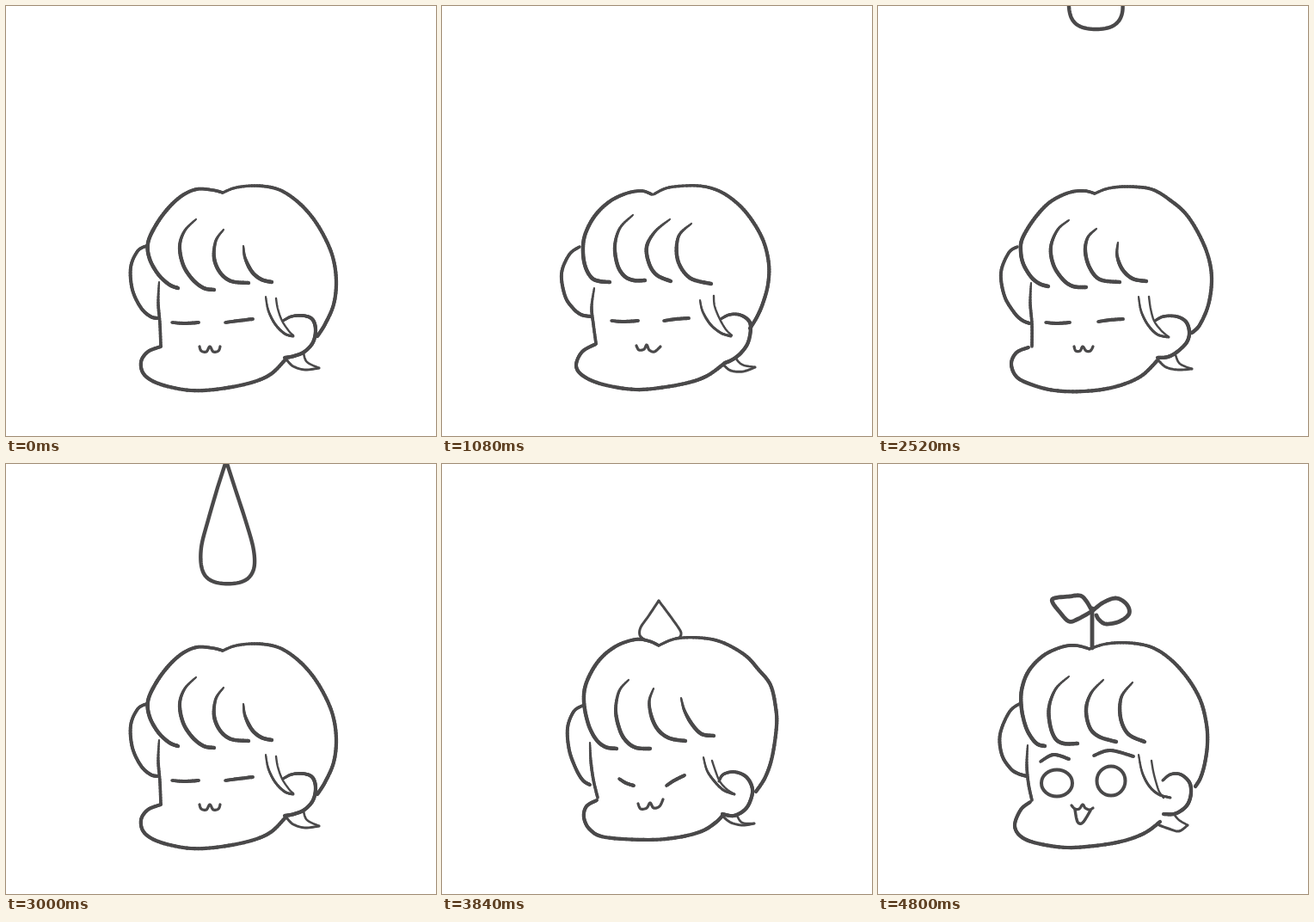
Write an HTML page with a canvas that moves like this. It is 500 by 500 pixels and loops after 5400 ms.

```html
<!DOCTYPE html>
<html lang="en">
<head>
<meta charset="utf-8">
<title>Sprout</title>
<style>
html, body { margin: 0; width: 100%; height: 100%; overflow: hidden; background: #fff; }
canvas { display: block; width: 500px; height: 500px; }
</style>
</head>
<body>
<canvas id="stage" width="500" height="500"></canvas>
<script>
const ctx = document.getElementById('stage').getContext('2d');
const STEP = 120, LOOP = 5400, LAST = 40;
const INK = '#4a494a';
const points = s => s.trim().split(/\s+/).map(p => p.split(',').map(Number));

// Each part: start width, end width, then one outline per key pose.
const REST = 0, WIDE = 1, LEAN = 2, WINCE = 3, AWAKE = 4;
const parts = {};
const part = (name, from, to, ...poses) => { parts[name] = { from, to, poses: poses.map(points) }; };

part('fringe', 3.4, 4.4,
  '252,217 240,214 222,213 204,221 187,237 173,257 165,276 167,294 177,312 190,324 200,328',
  '252,218 240,215 222,217 200,228 182,247 168,270 166,285 169,300 178,315 188,323 198,326',
  '244,219 232,215 214,218 194,228 177,245 166,267 164,287 167,304 174,316 183,320 195,321',
  '252,211 241,206 225,204 202,212 182,229 168,254 165,276 170,302 179,320 190,329 203,331',
  '246,215 230,211 213,213 192,223 175,241 167,263 167,285 172,306 179,319 186,326 194,328');
part('crown', 3, 4.2,
  '252,217 268,211 292,209 316,213 336,225 354,243 369,266 380,292 384,320 381,347 371,370 362,384',
  '252,218 268,212 290,210 318,213 340,226 359,243 375,269 385,295 388,320 384,348 374,371 365,380',
  '246,219 264,211 297,209 322,215 344,230 361,250 374,274 380,300 379,324 373,346 366,362 358,375',
  '252,211 272,203 299,202 325,207 352,222 368,239 382,257 388,283 389,305 384,340 376,364 365,381',
  '246,215 266,209 292,208 318,213 340,227 360,249 375,275 382,303 383,326 380,348 375,365 369,375');
part('lock1', 2, 4.4,
  '221,248 208,261 202,279 206,301 217,318 230,328 242,330',
  '222,249 209,260 201,280 204,301 215,318 227,326 242,327',
  '222,243 207,258 201,279 204,301 212,314 223,319 236,319',
  '217,251 206,264 202,287 207,310 215,323 226,330 242,331',
  '222,247 207,261 199,282 200,303 206,319 216,325 232,325');
part('lock2', 2, 4.4,
  '253,260 244,273 242,293 249,310 262,320 282,322',
  '254,259 244,269 241,285 246,304 258,318 281,321',
  '265,248 248,262 238,280 241,300 250,313 266,320',
  '246,261 241,276 244,295 252,310 265,319 283,322',
  '262,251 248,266 242,285 246,306 257,317 277,323');
part('lock3', 2, 4.4,
  '276,279 278,293 286,309 297,318 309,321',
  '279,275 278,290 284,306 296,317 312,320',
  '290,253 275,268 274,295 288,316 313,323',
  '278,272 282,287 291,303 302,314 316,316',
  '296,254 283,271 282,295 291,314 310,323');
part('back', 3.4, 4,
  '163,279 153,285 145,304 147,330 157,351 168,361 176,363',
  '162,280 152,287 143,310 147,337 158,356 167,365 176,369',
  '160,280 148,289 139,311 143,337 152,351 162,359 174,361',
  '163,281 153,288 146,307 148,333 156,355 164,368 172,373',
  '166,278 153,288 142,314 144,338 154,354 163,360 173,363');
part('cheek', 2, 3.6,
  '178,321 177,345 179,370 180,396',
  '178,322 177,345 179,370 179,396',
  '177,328 174,350 176,370 179,392',
  '172,324 173,345 176,367 181,388',
  '174,327 173,350 175,372 179,391');
part('jaw', 4, 4.2,
  '180,396 165,402 157,414 161,429 180,440 215,447 250,445 285,438 308,428 325,411',
  '175,397 161,403 155,416 161,431 178,440 205,447 240,448 275,443 305,431 325,412',
  '179,393 163,402 156,418 164,430 187,440 225,446 260,443 290,437 310,429 329,415',
  '180,391 168,398 165,411 172,425 190,434 240,437 275,434 302,427 318,417 327,408',
  '177,393 166,402 159,420 166,433 185,441 220,446 260,443 290,437 312,428 328,416');
part('ear', 3, 4.2,
  '322,366 332,361 345,360 356,364 360,376 357,391 347,402 335,407 324,409',
  '322,366 332,361 347,361 358,367 362,379 359,391 348,402 337,408 325,409',
  '324,364 334,359 346,359 356,365 359,374 356,391 348,403 338,411 329,415',
  '322,369 327,361 340,358 354,364 361,378 358,393 351,403 339,409 326,407',
  '331,368 340,361 352,361 362,370 364,382 361,394 354,402 344,407 332,407');
part('sideOuter', 2, 3,
  '302,338 305,354 313,370 324,381 334,384',
  '303,338 306,355 314,371 325,382 338,385',
  '300,342 303,355 312,370 324,380 336,384',
  '304,341 308,356 316,368 327,379 340,384',
  '303,338 307,358 315,374 326,384 340,388');
part('sideInner', 2.4, 2.4,
  '314,340 316,352 321,366 329,378 334,383',
  '315,338 317,352 321,366 329,377 337,384',
  '316,337 317,349 323,364 330,376 337,383',
  '314,345 318,357 323,369 331,378 340,384',
  '318,345 320,357 323,369 327,381 332,388');
part('tuft', 3, 3,
  '326,411 334,419 348,423 364,421',
  '326,412 335,420 349,423 365,422',
  '328,418 336,424 350,425 364,420',
  '327,410 336,417 350,420 363,418',
  '327,420 338,424 350,427 360,420');
part('tuftInner', 2.6, 2.6,
  '346,404 350,414 364,421', '346,406 351,416 365,422', '341,409 349,417 364,420',
  '343,409 349,417 363,418', '344,407 350,414 360,420');
// In the awake pose these two strokes serve as brows.
part('eyeL', 3.4, 4,
  '193,368 208,369 224,368', '195,368 208,369 223,368', '197,366 211,367 228,366',
  '206,366 214,371 223,374', '189,346 204,338 222,343');
part('eyeR', 3.6, 4,
  '255,368 270,366 287,364', '256,367 270,365 285,364', '258,366 272,364 287,363',
  '261,374 270,368 282,362', '251,339 270,333 297,340');
part('mouth', 3.2, 3.2,
  '225,396 227,401 233,402 237,396 241,402 247,401 249,396',
  '228,396 230,401 235,401 238,396 242,401 247,401 250,396',
  '226,395 229,400 235,399 238,394 241,400 247,402 254,396',
  '228,395 231,401 238,400 242,394 246,400 253,398 257,390',
  '225,397 229,401 234,401 238,396 241,400 246,402 250,400');

const TEAR = points('246,27 235,65 227,97 228,122 238,135 258,139 278,135 288,122 288,100 280,70 267,30');
const HALF_TEAR = [points('252,159 240,177 231,190 230,199 235,204'), points('252,159 264,175 276,192 278,198 276,202')];
const STEM = points('249,214 249,190 249,168');
const LEAVES = [
  points('249,171 242,159 235,153 222,154 205,156 203,161 212,173 222,183 233,180 249,171'),
  points('249,171 262,161 277,156 289,163 292,174 281,183 265,186 257,181 254,176')
];
const TONGUE = points('229,402 232,416 238,417 247,403');

// Pose steps: from, to, blend, vertical shift
const IDLE = [[REST, REST, 0, 0], [WIDE, WIDE, 0, 0], [WIDE, LEAN, .2, 2], [WIDE, LEAN, .65, 0], [LEAN, LEAN, 0, 0]];
const REACT = [
  [REST, WINCE, .6, -1], [WINCE, WINCE, 0, 0], [WINCE, LEAN, .15, 0], [WINCE, LEAN, .25, 0], [WINCE, WINCE, 0, 2],
  [WINCE, LEAN, .5, 3], [AWAKE, AWAKE, 0, -3], [AWAKE, AWAKE, 0, 3], [AWAKE, AWAKE, 0, -1], [AWAKE, AWAKE, 0, 0]
];
const SINK_TIP = { 31: 110, 32: 159, 33: 187 };
const SPROUT = { 36: [.4, .55], 37: [.7, 2.5], 38: [1.1, .75], 39: [.95, 1.15], 40: [1, 1] };

const lerp = (a, b, t) => a + (b - a) * t;
const blend = (a, b, t) => a.map(([x, y], i) => [lerp(x, b[i][0], t), lerp(y, b[i][1], t)]);

function curve(pts, per = 8) {
  const at = i => pts[Math.max(0, Math.min(pts.length - 1, i))];
  const out = [];
  for (let i = 0; i < pts.length - 1; i++) {
    for (let k = 0; k < per; k++) {
      const t = k / per;
      out.push([0, 1].map(d => {
        const [a, b, c, e] = [at(i - 1)[d], at(i)[d], at(i + 1)[d], at(i + 2)[d]];
        return b + .5 * t * (c - a + t * (2 * a - 5 * b + 4 * c - e + t * (3 * (b - c) + e - a)));
      }));
    }
  }
  out.push(at(pts.length));
  return out;
}

function line(pts, width) {
  ctx.lineWidth = width;
  ctx.beginPath();
  pts.forEach(([x, y]) => ctx.lineTo(x, y));
  ctx.stroke();
}

function brush(pts, from, to = from) {
  const path = curve(pts);
  if (from === to) return line(path, from);
  for (let i = 1; i < path.length; i++) {
    line([path[i - 1], path[i]], lerp(from, to, Math.min(1, 2.5 * i / path.length)));
  }
}

function drawTear(n) {
  if (n > 20 && n < 31) {
    const k = n - 21;
    const dy = 28 + 35.2 * k - 1.78 * k * k - 140;
    const dx = -4.5 * ((k - 4) / 4) ** 2;
    const move = ([x, y]) => [x + Math.max(dx, -4.5), y + dy];
    line([[256, -4], ...curve(TEAR), [256, -4]].map(move), 4.4);
  } else if (SINK_TIP[n]) {
    const s = (204 - SINK_TIP[n]) / 45;
    HALF_TEAR.forEach(h => line(curve(h.map(([x, y]) => [x, 204 + (y - 204) * s])), 3));
  }
}

function drawSprout(n) {
  if (!SPROUT[n]) return;
  const [sx, sy] = SPROUT[n];
  const fit = ([x, y]) => [249 + (x - 249) * sx, 214 + (y - 214) * sy];
  brush(STEM.map(fit), 4.8);
  LEAVES.forEach(l => brush(l.map(fit), 4.8));
}

function ring(x, y, rx, ry) {
  ctx.lineWidth = 4;
  ctx.beginPath();
  ctx.ellipse(x, y, rx, ry, 0, 0, 7);
  ctx.stroke();
}

function drawHead([a, b, t, dy]) {
  ctx.save();
  ctx.translate(0, dy);
  for (const { from, to, poses } of Object.values(parts)) {
    brush(blend(poses[a], poses[b], t), from, to);
  }
  if (a === AWAKE) {
    ring(208, 371, 18, 15.5);
    ring(271, 368.5, 16.5, 17);
    brush(TONGUE, 3.4);
  }
  ctx.restore();
}

function draw(n) {
  ctx.fillStyle = '#fff';
  ctx.fillRect(0, 0, 500, 500);
  ctx.strokeStyle = INK;
  ctx.lineCap = ctx.lineJoin = 'round';
  drawTear(n);
  drawHead(n <= 30 ? IDLE[n % 5] : REACT[n - 31]);
  drawSprout(n);
}

let shown = -1;
function tick() {
  const n = Math.min(LAST, Math.floor(performance.now() % LOOP / STEP));
  if (n !== shown) draw(shown = n);
  requestAnimationFrame(tick);
}
tick();
</script>
</body>
</html>
```
